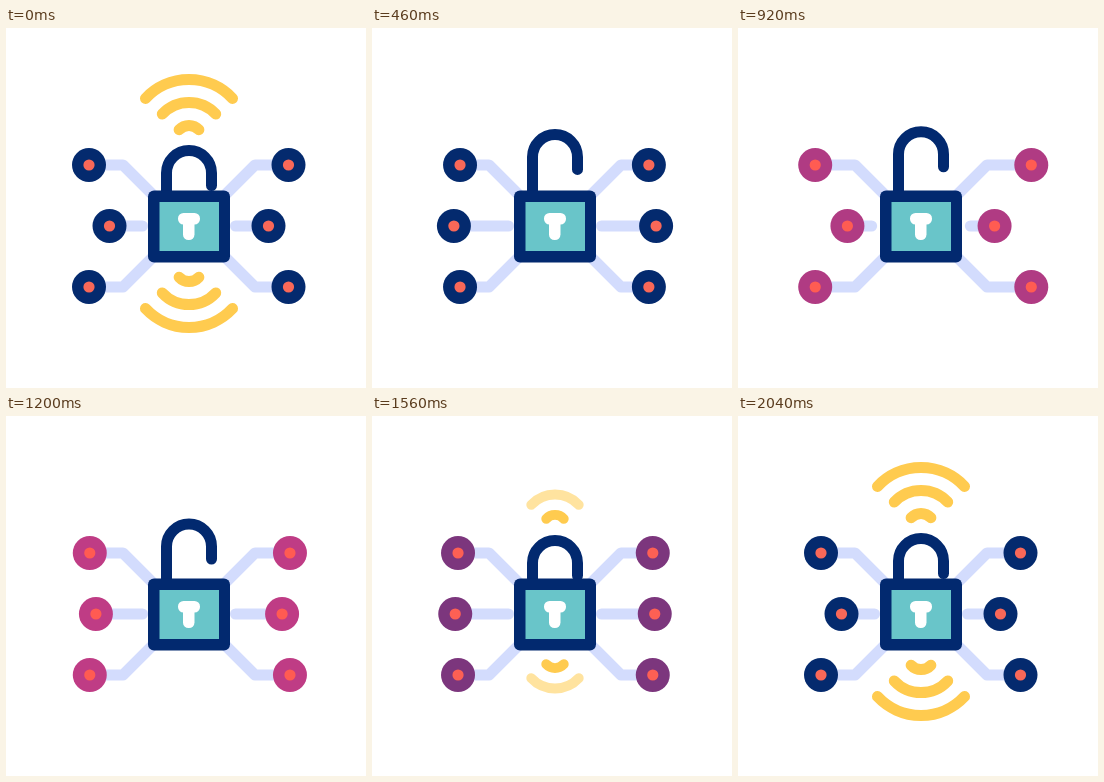
An HTML page for the animation above (2.4 s loop, 360 by 360 pixels).

```html
<!DOCTYPE html>
<html lang="en">
<head>
<meta charset="utf-8">
<title>Lock network</title>
<style>
  html, body { margin: 0; width: 100%; height: 100%; overflow: hidden; background: #fff; }
  svg { display: block; width: 100vw; height: 100vh; }
  .line { fill: none; stroke-linecap: round; stroke-linejoin: round; }
</style>
</head>
<body>
<svg id="stage" viewBox="0 0 360 360">
  <g id="waves"></g>
  <g id="links" class="line" stroke="#d3dcfd" stroke-width="11"></g>
  <g id="nodes"></g>
  <path id="shackle" class="line" stroke="#02296f" stroke-width="11"
        d="M160.5 190V145a22.5 22.5 0 0 1 45 0V157.5"/>
  <rect x="142" y="162.5" width="82" height="72" rx="6" fill="#02296f"/>
  <rect x="153.5" y="174" width="59.5" height="49" fill="#69c5c9"/>
  <rect x="172" y="185" width="22" height="11.5" rx="5.5" fill="#fff"/>
  <rect x="177" y="185" width="11.5" height="27" rx="5.5" fill="#fff"/>
</svg>
<script>
const LOOP = 2400;
const CX = 183;
const NAVY = [4, 42, 110], PINK = [191, 60, 133];
const CORAL = [249, 104, 88], RED = [255, 91, 82];
const $ = id => document.getElementById(id);

function add(parent, tag, attrs) {
  const el = document.createElementNS('http://www.w3.org/2000/svg', tag);
  set(el, attrs);
  parent.appendChild(el);
  return el;
}
function set(el, attrs) {
  for (const key in attrs) el.setAttribute(key, attrs[key]);
}

// Linear interpolation through [time, value] pairs
function track(steps, t) {
  if (t <= steps[0][0]) return steps[0][1];
  for (let i = 1; i < steps.length; i++) {
    const [t0, v0] = steps[i - 1], [t1, v1] = steps[i];
    if (t <= t1) return v0 + (v1 - v0) * (t - t0) / (t1 - t0);
  }
  return steps[steps.length - 1][1];
}
const mix = (a, b, k) => `rgb(${a.map((v, i) => Math.round(v + (b[i] - v) * k))})`;

// Node swing: rest, far, near, far, near, rest
const BEATS = [120, 696, 940, 1460, 1746, 2040];
const swing = (rest, a, b) => [rest, a, b, a, b, rest].map((v, i) => [BEATS[i], v]);
const MID = swing(79.5, 116, 70);
const LEFT = swing(100, 91.5, 107);
const RIGHT = swing(99.5, 90, 112);
const TINT = [[696, 0], [940, 1], [1460, 1], [1740, 0]];
const LIFT = [[120, 0], [460, -16], [550, -18.8], [1110, -18.7], [1200, -14.5],
              [1560, 2], [1670, 7], [1740, 7], [2040, 0]];
const SCALE = [[120, 1], [440, 1.24], [441, 0.78], [1400, 0.78], [1720, 1]];

const nodes = [];
for (const side of [-1, 1]) {
  for (const y of [137, 198, 259]) {
    nodes.push({
      side, y,
      path: y === 198 ? MID : side < 0 ? LEFT : RIGHT,
      link: add($('links'), 'path', {}),
      disc: add($('nodes'), 'circle', { cy: y, r: 17 }),
      dot: add($('nodes'), 'circle', { cy: y, r: 5.6 })
    });
  }
}

const groups = [[111, 1], [240, -1]].map(([y, flip]) => ({
  y, flip, el: add($('waves'), 'g', { class: 'line', stroke: '#ffcb4f', 'stroke-width': 11 })
}));
const arcs = [];
const SPREAD = 47 * Math.PI / 180;
for (const { el } of groups) {
  [13.5, 36.5, 59.5].forEach((r, i) => {
    const x = r * Math.sin(SPREAD), y = -r * Math.cos(SPREAD);
    arcs.push({
      el: add(el, 'path', { d: `M${-x} ${y}A${r} ${r} 0 0 1 ${x} ${y}` }),
      fade: [[120 + i * 80, 1], [280 + i * 80, 0],
             [1400 + i * 90, 0], [1530 + i * 90, 1]]
    });
  });
}

function draw(t) {
  const tint = track(TINT, t);
  for (const n of nodes) {
    const d = track(n.path, t);
    const x = CX + n.side * d;
    set(n.disc, { cx: x, fill: mix(NAVY, PINK, tint) });
    set(n.dot, { cx: x, fill: mix(CORAL, RED, tint) });
    if (n.y === 198) {
      // The middle link draws back into its node at the innermost point
      const inner = 46.5 + 0.0139 * Math.max(0, 79.5 - d) ** 3;
      set(n.link, { d: `M${x} 198H${CX + n.side * Math.min(d, inner)}` });
    } else {
      const up = n.y < 198 ? 1 : -1;
      set(n.link, { d: `M${x} ${n.y}H${CX + n.side * 66}L${CX + n.side * 36} ${n.y + up * 30}` });
    }
  }
  set($('shackle'), { transform: `translate(0 ${track(LIFT, t)})` });
  const s = track(SCALE, t);
  for (const g of groups) {
    set(g.el, { transform: `translate(${CX} ${g.y}) scale(${s} ${s * g.flip})` });
  }
  for (const a of arcs) set(a.el, { opacity: track(a.fade, t) });
}

const start = performance.now();
function tick() {
  draw((performance.now() - start) % LOOP);
  requestAnimationFrame(tick);
}
tick();
</script>
</body>
</html>
```
